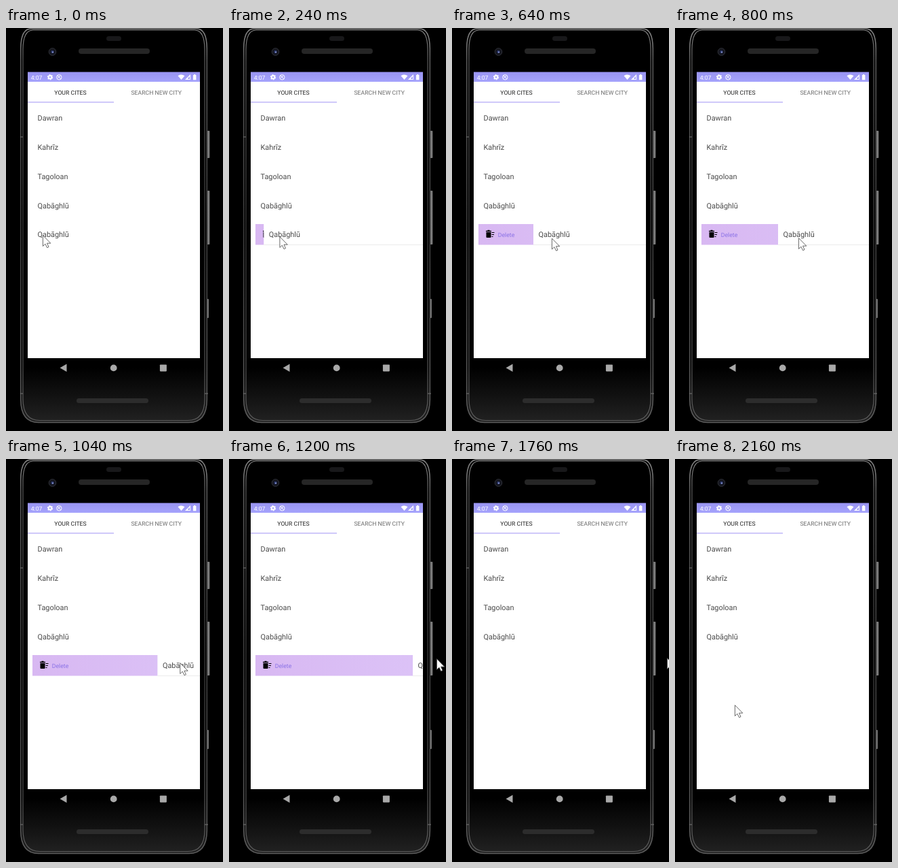
An HTML page for the animation above (2.24 s loop, 320 by 592 pixels).

```html
<!DOCTYPE html>
<html lang="en">
<head>
<meta charset="utf-8">
<title>Swipe to delete</title>
<style>
html, body { margin: 0; width: 100%; height: 100%; overflow: hidden; background: #000; }
svg { display: block; width: 320px; height: 592px; }
text { font-family: Roboto, "Noto Sans", sans-serif; font-size: 8.7px; text-rendering: geometricPrecision; }
.city { font-size: 10.9px; fill: #4a4a4a; }
</style>
</head>
<body>
<svg viewBox="0 0 320 592">
  <defs>
    <linearGradient id="metal" x2="0" y2="1">
      <stop stop-color="#8a8a8a"/><stop offset=".08" stop-color="#5a5a5a"/>
      <stop offset=".5" stop-color="#3c3c3c"/><stop offset="1" stop-color="#5c5c5c"/>
    </linearGradient>
    <linearGradient id="body" x2="0" y2="1">
      <stop offset=".86" stop-color="#000"/><stop offset="1" stop-color="#222"/>
    </linearGradient>
    <linearGradient id="button">
      <stop stop-color="#3a3a3a"/><stop offset=".6" stop-color="#8c8c8c"/><stop offset="1" stop-color="#555"/>
    </linearGradient>
    <linearGradient id="bar" x2="0" y2="1">
      <stop stop-color="#9994f2"/><stop offset="1" stop-color="#a5a3fc"/>
    </linearGradient>
    <linearGradient id="lilac">
      <stop stop-color="#d8b8f2"/><stop offset="1" stop-color="#dcc3f7"/>
    </linearGradient>
    <clipPath id="screen"><rect x="32" y="65" width="254" height="420"/></clipPath>
    <clipPath id="open"><rect id="openBox" x="39" y="288" height="31"/></clipPath>
  </defs>
  <rect width="320" height="592"/>

  <!-- phone -->
  <g fill="url(#button)">
    <rect x="296" y="151" width="4.500" height="40" rx="1"/>
    <rect x="296" y="239" width="4.500" height="79" rx="1"/>
    <rect x="296" y="398" width="3" height="28" rx="1"/>
  </g>
  <path d="M21.700 30Q22 1 37 1H281Q296 1 296.300 30V546Q296 579.500 270 579.500H48Q22 579.500 21.700 546Z" fill="url(#body)" stroke="url(#metal)" stroke-width="1.600"/>
  <path d="M25 32Q25 3 40 3H278Q293 3 293 32V545Q293 576.500 268 576.500H50Q25 576.500 25 545Z" fill="none" stroke="url(#metal)" stroke-width="1.200"/>
  <path d="M21 160h4M293 537h5M21 537h4" stroke="#777"/>
  <rect x="107" y="30" width="105" height="8" rx="4" fill="#262626"/>
  <rect x="104" y="544" width="106" height="7" rx="3.500" fill="#2c2c2c"/>
  <rect x="148" y="12" width="22" height="7" rx="3.500" fill="#18181a"/>
  <circle cx="68.500" cy="35" r="5.300" fill="#14151d" stroke="#30323a"/>
  <circle cx="68.500" cy="35" r="2.300" fill="#273365"/>
  <circle cx="69" cy="35.500" r="1" fill="#a5b0e8"/>

  <!-- screen -->
  <rect x="32" y="65" width="254" height="420" fill="#fff"/>
  <rect x="32" y="64.600" width="254" height="14.400" fill="url(#bar)"/>
  <g fill="#fff">
    <text x="36.700" y="75.500">4:07</text>
    <circle cx="65" cy="72.300" r="2.300" fill="none" stroke="#fff" stroke-width="2"/>
    <circle cx="65" cy="72.300" r="3.600" fill="none" stroke="#fff" stroke-width="1.200" stroke-dasharray="1.900 1.870"/>
    <circle cx="78.300" cy="72.300" r="3.700" fill="none" stroke="#fff"/>
    <path d="M76 70l4.600 4.600M76.500 73.500l1.500-2.500h2" fill="none" stroke="#fff"/>
    <path d="M253.500 70.300Q258.500 66.700 263.500 70.300L258.500 76zM264 76l8-8v8z"/>
    <path d="M276 69h1.200v-1h2v1h1.200v7.200H276z"/>
  </g>
  <path d="M268.500 73.500l2.500-2.500v4h-2.500z" fill="#a19df7"/>
  <text x="71.300" y="98.300" fill="#222">YOUR CITES</text>
  <text x="184.400" y="98.300" fill="#6c6c6c">SEARCH NEW CITY</text>
  <rect x="32" y="108" width="127" height="2" fill="#cfc9fa"/>
  <g id="list"></g>

  <g id="row" clip-path="url(#screen)">
    <g clip-path="url(#open)">
      <rect x="39" y="288" width="247" height="30.500" fill="url(#lilac)"/>
      <path d="M50 298.500h8M52.500 297.500h3" stroke="#000" stroke-width="1.500"/>
      <path d="M50.500 300h7v7q0 1-1 1h-5q-1 0-1-1z"/>
      <path d="M58.500 300.500h4M58.500 303.500h3.500M58.500 306.500h2" stroke="#000" stroke-width="1.200"/>
      <text x="67.800" y="306.800" fill="#8a72e6">Delete</text>
    </g>
    <g id="card">
      <path id="edge" d="M39 318.500H286" stroke="#ececec"/>
      <text class="city" x="46.500" y="307.400">Qabāghlū</text>
    </g>
  </g>

  <!-- navigation -->
  <g fill="#a9a9a9">
    <path d="M79.500 499.300l10-5.800v11.600z"/>
    <circle cx="158.700" cy="499.400" r="4.900"/>
    <rect x="226.900" y="494.400" width="10" height="10" rx=".8"/>
  </g>

  <path id="cursor" d="M.4.600V16.500L3.900 13.200 6.600 18.700 9 17.600 6.500 12.200H11.800Z" fill="#fff" stroke="#444" stroke-width=".8"/>
</svg>
<script>
const LOOP = 2240, STEP = 80, GONE = 1360;
const $ = id => document.getElementById(id);

$("list").innerHTML = ["Dawran", "Kahrīz", "Tagoloan", "Qabāghlū"]
  .map((name, i) => `<text class="city" x="46.5" y="${136.3 + i * 42.8}">${name}</text>`).join("");

// Keys: time, pointer x, pointer y, row offset
const keys = [
  [0, 54, 304, 0], [160, 62, 305, 0], [480, 112, 309, 49], [800, 182, 308, 113],
  [1200, 306, 293, 232], [1280, 317, 292, 247], [1760, 317, 292, 247], [2160, 88, 361, 247]
];

function pose(t) {
  const i = keys.findIndex(k => k[0] > t);
  if (i < 0) return keys[keys.length - 1];
  const a = keys[i - 1], b = keys[i], u = (t - a[0]) / (b[0] - a[0]);
  return a.map((v, j) => v + (b[j] - v) * u);
}

function draw(now) {
  const t = Math.floor(now % LOOP / STEP) * STEP;
  const [, x, y, offset] = pose(t);
  $("cursor").setAttribute("transform", `translate(${x} ${y})`);
  $("card").setAttribute("transform", `translate(${offset})`);
  $("openBox").setAttribute("width", offset);
  $("edge").style.display = offset ? "" : "none";
  $("row").style.display = t < GONE ? "" : "none";
}

const start = performance.now();
function tick() {
  draw(performance.now() - start);
  requestAnimationFrame(tick);
}
tick();
</script>
</body>
</html>
```
